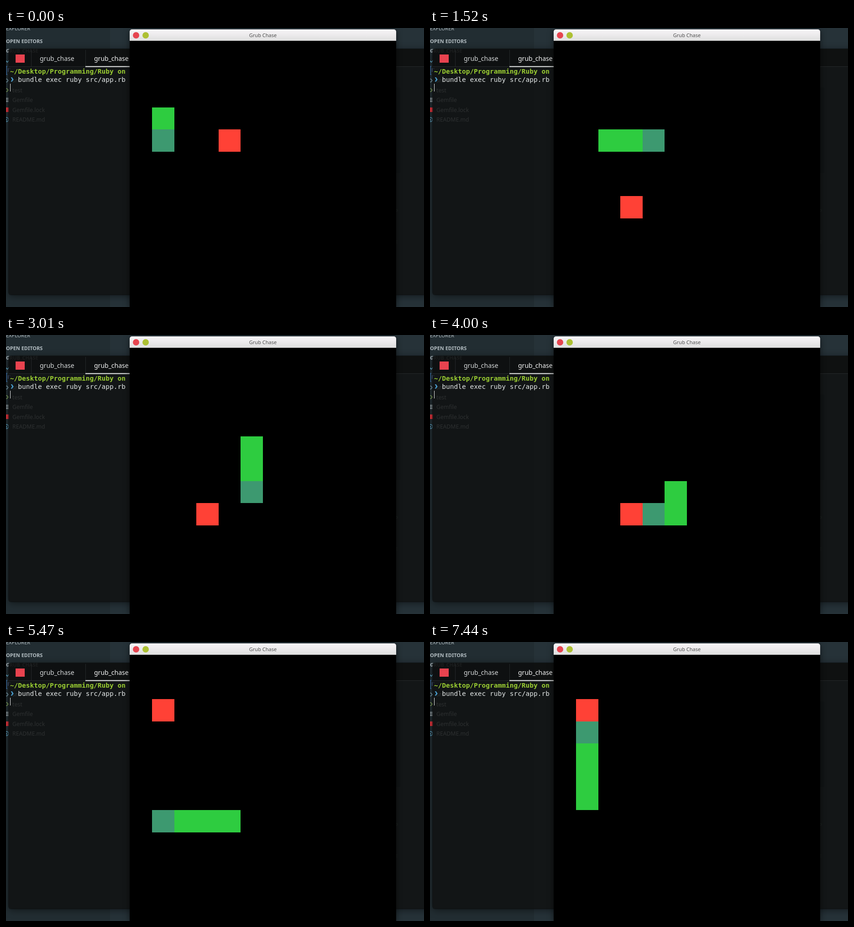
These frames come from a looping animation (916 by 611 pixels, 8000 ms). An HTML page with a canvas:

```html
<!DOCTYPE html>
<html lang="en">
<head>
<meta charset="utf-8">
<title>Grub Chase</title>
<style>
  html, body { margin: 0; width: 100%; height: 100%; overflow: hidden; background: #263238; }
  #stage { position: relative; width: 916px; height: 611px; overflow: hidden; background: #263238; }
  #stage > * { position: absolute; }
  svg { left: 0; top: 0; }
  text { white-space: pre; }
  .ui { font-family: "Noto Sans", "Open Sans", sans-serif; }
  .mono { font: 14.5px "DejaVu Sans Mono", "Noto Sans Mono", monospace; }
  .sidebar { left: 0; top: 0; width: 228px; height: 611px; background: #222d32; }
  .terminal {
    left: 6px; top: 46px; width: 930px; height: 538px; border-radius: 5px;
    background: rgba(15, 16, 17, .82);
    box-shadow: 0 3px 16px rgba(0, 0, 0, .5), 0 0 0 1px rgba(8, 10, 11, .6);
  }
  .tabs { height: 38px; background: rgba(12, 13, 14, .55); border-bottom: 1px solid #26292b; border-radius: 5px 5px 0 0; }
  .game {
    left: 271px; top: 3px; width: 584px; height: 608px; background: #000;
    border-radius: 5px 5px 0 0; box-shadow: 0 3px 14px rgba(0, 0, 0, .55);
  }
  .bar {
    height: 25px; border-radius: 5px 5px 0 0;
    background: linear-gradient(#f8f5f8, #e9e8e9 60%, #dedede);
    font-size: 11px; line-height: 25px; text-align: center; color: #4d4d4d;
  }
  .dot { position: absolute; top: 5.5px; width: 14px; height: 14px; border-radius: 50%; }
  canvas { left: 0; top: 0; }
</style>
</head>
<body>
<div id="stage">
  <div class="sidebar"></div>
  <svg class="ui" width="916" height="611" font-size="12.3" fill="#b4bec3">
    <text x="0" y="5" font-size="11">EXPLORER</text>
    <g font-size="11" font-weight="700">
      <text x="0" y="33" textLength="">OPEN EDITORS</text>
      <text x="0" y="54">GRUB_CHASE</text>
    </g>
    <text x="14" y="119">src</text>
    <text x="14" y="141">test</text>
    <text x="14" y="162">Gemfile</text>
    <text x="14" y="183.500">Gemfile.lock</text>
    <text x="14" y="205">README.md</text>
    <g fill="none" stroke-width="1.3">
      <path d="M-2 70l5 5 4-5" stroke="#69b7d8"/>
      <path d="M1 111l4 4-4 4" stroke="#8fb6c6"/>
      <path d="M1 132l4 4-4 4" stroke="#9cc063"/>
      <path d="M0 154h6M0 157.500h6M0 161h6" stroke="#c2ccd0"/>
      <path d="M3 84h-2v18h2" stroke="#3d6fa8"/>
      <path d="M5 96v-7h5" stroke="#6d87c8"/>
      <circle cx="1" cy="200.500" r="4.500" stroke="#5fa6c8"/>
      <path d="M1 199v4" stroke="#5fa6c8"/>
    </g>
    <rect x="0" y="174" width="7" height="10" fill="#d8343c"/>
    <g font-size="10" fill="#6f8a72">
      <text x="853" y="405">P</text>
      <text x="853" y="474">F</text>
    </g>
    <rect x="845" y="130" width="19" height="188" rx="4" fill="#1d272c"/>
  </svg>
  <div class="terminal"><div class="tabs"></div></div>
  <svg width="916" height="611">
    <path d="M55.500 48v36M174.500 48v36" stroke="#25282a"/>
    <rect x="21" y="58" width="20" height="18" fill="#e8434f"/>
    <g class="ui" font-size="14" fill="#d5d8d9">
      <text x="74" y="72">grub_chase</text>
      <text x="193" y="72" fill="#f4f5f5">grub_chase</text>
    </g>
    <rect x="174" y="83.500" width="119" height="2" fill="#eceeee"/>
    <g class="mono">
      <text x="8.800" y="100" font-weight="700" fill="#9acd32">~/Desktop/Programming/Ruby on</text>
      <path d="M10.500 108h2.800l3.200 4.800-3.200 4.800h-2.800l3-4.800z" fill="#4a9fd0"/>
      <text x="26.300" y="117.500" fill="#e4e8e8">bundle exec ruby src/app.rb</text>
    </g>
    <rect x="9" y="122" width="1" height="17" fill="#e8ebeb"/>
  </svg>
  <div class="game">
    <div class="bar ui">
      <i class="dot" style="left:7px;background:#e64550"></i>
      <i class="dot" style="left:28px;background:#adc033"></i>
      Grub Chase
    </div>
  </div>
  <canvas id="board" width="916" height="611"></canvas>
</div>
<script>
  const LOOP = 8000;
  const CELL = 48.63, LEFT = 271.25, TOP = 27.9;
  const HEAD = '#3d9970', BODY = '#2ecc40', FOOD = '#ff4136';
  const MOVES = 'RRRRDDDLLLLUUUU';
  const TIMES = [460, 970, 1520, 2010, 2510, 3010, 3510, 4000,
                 4510, 4970, 5470, 5960, 6450, 6950, 7440];
  const STEP = { R: [1, 0], L: [-1, 0], U: [0, -1], D: [0, 1] };

  // Plays the game once and keeps the state after every move.
  function play() {
    const foods = [[4, 4], [3, 7], [1, 2]];
    let snake = [[1, 4], [1, 3]];
    const states = [{ snake, food: foods[0] }];
    for (const move of MOVES) {
      const [x, y] = snake[0], [dx, dy] = STEP[move];
      const head = [x + dx, y + dy];
      const eats = String(head) === String(foods[0]);
      if (eats) foods.shift();
      snake = [head, ...(eats ? snake : snake.slice(0, -1))];
      states.push({ snake, food: foods[0] });
    }
    return states;
  }

  const states = play();
  const ctx = document.getElementById('board').getContext('2d');

  function cell([col, row], color) {
    const x = Math.round(LEFT + col * CELL), y = Math.round(TOP + row * CELL);
    const right = Math.round(LEFT + (col + 1) * CELL);
    const bottom = Math.round(TOP + (row + 1) * CELL);
    ctx.fillStyle = color;
    ctx.fillRect(x, y, right - x, bottom - y);
  }

  let shown = -1;
  function draw(now) {
    const t = now % LOOP;
    const index = TIMES.filter(time => time <= t).length;
    if (index !== shown) {
      const { snake, food } = states[index];
      ctx.clearRect(0, 0, 916, 611);
      cell(food, FOOD);
      snake.forEach((part, i) => cell(part, i ? BODY : HEAD));
      shown = index;
    }
    requestAnimationFrame(draw);
  }
  draw(performance.now());
</script>
</body>
</html>
```
